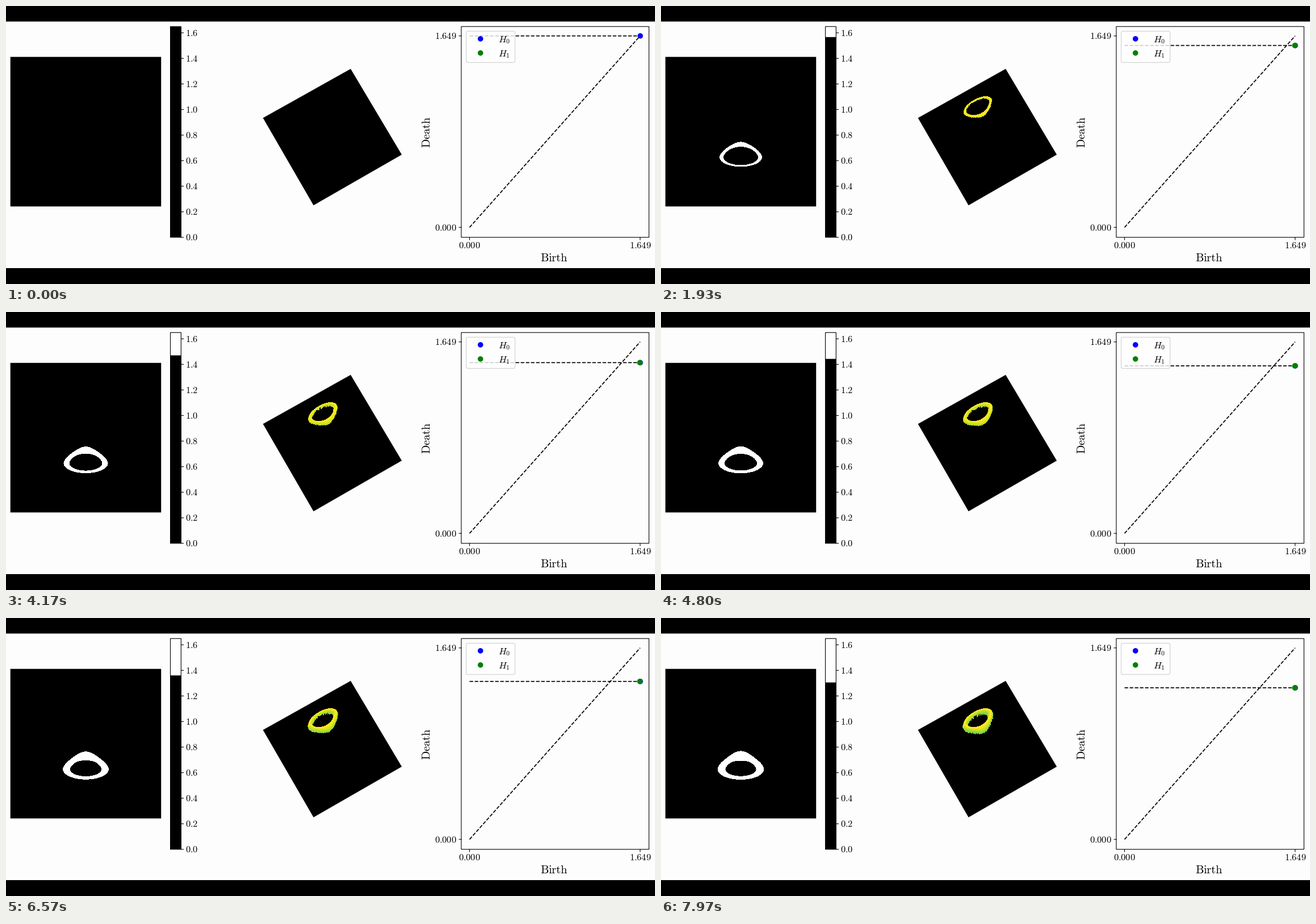
A matplotlib script that plays this animation: 1143 by 490 pixels, repeating every 8000 ms.

```python
import numpy as np
import matplotlib.pyplot as plt
from matplotlib.animation import FuncAnimation
from matplotlib.patches import Circle, FancyBboxPatch, Polygon, Rectangle

W, H, DPI = 1143, 490, 64
PT = 72 / DPI                      # points per pixel
FRAMES, INTERVAL = 250, 32
STEP_MS, LEVELS = 312.5, 120
TOP = 1.649                        # highest value of the field
PAPER = "#fdfdfd"

plt.rcParams["mathtext.fontset"] = "cm"
fig = plt.figure(figsize=(W / DPI, H / DPI), dpi=DPI, facecolor="black")
ax = fig.add_axes([0, 0, 1, 1])
ax.set_axis_off()


def rect(x0, y0, x1, y1, color, **kw):
    patch = Rectangle((x0, y0), x1 - x0, y1 - y0, fc=color, lw=0,
                      snap=False, **kw)
    return ax.add_patch(patch)


def frame(x0, y0, x1, y1):
    ax.add_patch(Rectangle((x0, y0), x1 - x0, y1 - y0, fill=False, snap=False,
                           ec="black", lw=1.1 * PT, zorder=4))


def line(xs, ys, width=1.1, **kw):
    return ax.plot(xs, ys, color="black", lw=width * PT, snap=False, **kw)[0]


def dot(x, y, color, z):
    return ax.add_patch(Circle((x, y), 4.8, fc=color, lw=0, zorder=z))


def label(x, y, s, size=16.4, roman=True, **kw):
    s = rf"$\mathrm{{{s}}}$" if roman else f"${s}$"
    kw = {"va": "baseline", "zorder": 7, **kw}
    ax.text(x, y, s, fontsize=size * PT, color="black", **kw)


def field(x, y):
    """Ridge along a flat-bottomed dome, falling off quadratically."""
    dx, dy = np.abs(x - 140.5), 266.5 - y
    r = np.hypot(dx, dy) + 1e-9
    c, s = dx / r, np.abs(dy) / r
    up = dy > 0
    n = np.where(up, 1.65, 2.0)
    height = np.where(up, 22.2, 15.3)
    ridge = ((c / 34) ** n + (s / height) ** n) ** (-1 / n)
    crest = np.where(r > ridge, 0.41, 0.22) * s ** 4
    width = ridge * (0.35 + np.where(up, crest, 0))
    return TOP - ((r - ridge) / width) ** 2


def project(x, y, z):
    """Tilted, slightly perspective view of the surface from above."""
    u, v = (x - 8) / 265, (353 - y) / 263
    px = 607 - 154 * u + 89.5 * v
    py = 111 + 86.5 * u + 152.5 * v
    zoom = 1 / (1 - 0.06 * z)
    return 575 + zoom * (px - 575), 231 + zoom * (py - 231) - 15.9 * z


def death_y(level):
    return 390.2 - level * 337.5 / TOP


def bar_y(level):
    return 407.8 - level * 371.6 / TOP


rect(0, 27.4, W, 462, PAPER, zorder=0)

# thresholded image
rect(7.7, 89.7, 273.2, 353.3, "black", zorder=1)
X0, X1, Y0, Y1 = 96, 186, 230, 288
cx, cy = np.meshgrid(np.arange(X0, X1) + 0.5, np.arange(Y1, Y0, -1) - 0.5)
cells = field(cx, cy)
mask_img = ax.imshow(np.zeros(cells.shape), cmap="gray", vmin=0, vmax=1,
                     extent=(X0, X1, Y1, Y0), origin="lower",
                     interpolation="nearest", aspect="auto", zorder=2)

# colour bar
rect(289.2, 36.2, 308.4, 407.8, "black", zorder=1)
bar_top = rect(289.2, 36.2, 308.4, 36.2, "white", zorder=2)
frame(289.5, 36.2, 308.3, 407.7)
for k in range(9):
    y = bar_y(k / 5)
    line([308.5, 312.5], [y, y])
    label(315.5, y + 5.5, f"{k / 5:.1f}")

# surface, ordered back to front
ax.add_patch(Polygon([(607, 110.8), (697, 262), (541.6, 351.3), (452.6, 197.3)],
                     fc="black", lw=0, zorder=1))
gx, gy = np.meshgrid(np.arange(X0, X1 + 1), np.arange(Y1, Y0 - 1, -1))
mx, my = project(gx, gy, np.clip(field(gx, gy), 0, TOP))
surface = ax.pcolormesh(mx, my, cells, cmap="viridis", vmin=0, vmax=TOP,
                        shading="flat", antialiased=False, zorder=2)

# persistence diagram
frame(801.8, 36.2, 1132.4, 407.7)
for value, x in ((0, 816.4), (TOP, 1116.8)):
    y = death_y(value)
    line([x, x], [408, 412], zorder=3)
    line([798, 802], [y, y], zorder=3)
    label(x, 427, f"{value:.3f}", ha="center")
    label(793.5, y + 5.6, f"{value:.3f}", ha="right")
label(965.5, 450, "Birth", 20.3, ha="center")
label(751, 222, "Death", 20.3, rotation=90, ha="right", va="center")

dashes = {"ls": (0, (3.7, 1.6)), "zorder": 2}
line([816.4, 1116.8], [death_y(0), death_y(TOP)], 1.7, **dashes)
sweep = line([816.4, 1116.8], [death_y(TOP)] * 2, 1.7, **dashes)
blue = dot(1117, death_y(TOP), "blue", 2.5)
green = dot(1116.3, death_y(TOP), "green", 2.6)

# legend
ax.add_patch(FancyBboxPatch((813.5, 47.5), 80, 49, fc=(1, 1, 1, 0.8),
                            ec=(0.8, 0.8, 0.8, 0.8), lw=1.3 * PT, zorder=5,
                            boxstyle="round,pad=3,rounding_size=3"))
for k, color in enumerate(("blue", "green")):
    dot(835.6, 57.8 + 25 * k, color, 6)
    label(867, 64 + 25 * k, f"H_{k}", roman=False)

ax.set_xlim(0, W)
ax.set_ylim(H, 0)


def update(i):
    step = int((i * INTERVAL + 8) / STEP_MS)
    level = TOP * (1 - step / LEVELS)
    on = cells > level
    mask_img.set_data(on.astype(float))
    surface.set_array(np.ma.masked_where(~on, cells))
    surface.set_visible(step > 0)
    bar_top.set_height(bar_y(level) - bar_y(TOP))
    y = death_y(level)
    sweep.set_ydata([y, y])
    blue.set_center((1117, y))
    green.set_center((1116.3, y))
    green.set_visible(step > 0)
    return mask_img, surface, bar_top, sweep, blue, green


anim = FuncAnimation(fig, update, frames=FRAMES, interval=INTERVAL,
                     init_func=lambda: update(0), repeat=True, repeat_delay=0)
plt.show()
```
